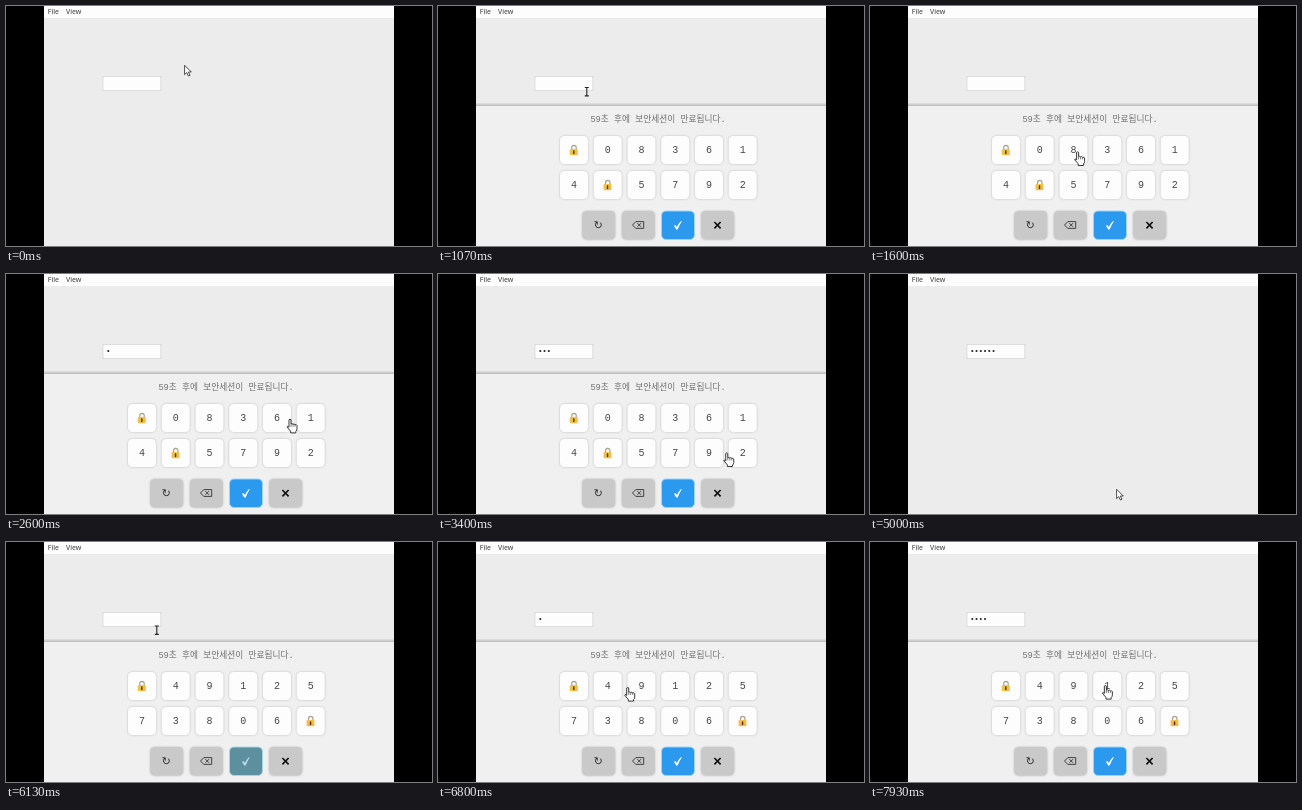
An HTML page for the animation above (8 s loop, 426 px wide and 240 px high).

```html
<!DOCTYPE html>
<html lang="ko">
<head>
<meta charset="utf-8">
<title>Secure keypad</title>
<style>
  html, body { margin: 0; width: 100%; height: 100%; overflow: hidden; background: #000; }
  svg { display: block; width: 100vw; height: 100vh; }
  .menu { font: 7px "Noto Sans", "Open Sans", sans-serif; fill: #3c3c38; }
  .notice { font: 8.7px "Liberation Mono", "Noto Sans CJK KR", "Noto Sans CJK", monospace; fill: #707070; }
  .digit { font: 10px "Liberation Mono", monospace; fill: #444; }
  .icon { font: 11px "DejaVu Sans", sans-serif; fill: #333; }
  .notice, .digit, .icon { text-anchor: middle; }
  .key { fill: #fdfdfd; }
  .key, .action { filter: drop-shadow(0 .8px 1px rgba(0, 0, 0, .22)); }
  .action { fill: #c9c9c9; }
  .ok { fill: #2b99ee; stroke: #9fd2f6; filter: none; }
  .line { fill: none; stroke: #333; stroke-width: .9; }
  .pointer path { stroke-linejoin: round; }
  .dull .ok { fill: #5c909e; stroke: #a5d6e0; }
  .dull .tick { fill: #b9dce5; }
  .dull .brass { fill: #bd9f66; }
</style>
</head>
<body>
<svg viewBox="0 0 426 240">
  <defs>
    <linearGradient id="edge" x2="0" y2="1">
      <stop offset="0" stop-color="#000" stop-opacity="0"/>
      <stop offset="1" stop-color="#000" stop-opacity=".22"/>
    </linearGradient>
    <g id="lock">
      <path d="M-2.2-.6V-2.4a2.2 2.2 0 0 1 4.4 0v1.8" fill="none" stroke="#aaa08c" stroke-width="1.2"/>
      <rect class="brass" x="-4.2" y="-.9" width="8" height="6.2" rx="1" fill="#efc14b"/>
      <path d="M-.2 1V3.4" stroke="#4a3a20" stroke-width="1.5" stroke-linecap="round"/>
    </g>
  </defs>
  <rect width="426" height="240"/>
  <rect x="38" width="350" height="240" fill="#ececec"/>
  <rect x="38" width="350" height="12" fill="#fdfdfd"/>
  <text class="menu" x="41.8" y="8.2">File</text>
  <text class="menu" x="60" y="8.2">View</text>
  <rect x="97" y="70.4" width="57.8" height="14.2" fill="#fdfdfd" stroke="#d8d8d8" stroke-width=".8"/>
  <g id="dots" fill="#222"></g>

  <g id="panel">
    <rect x="38" y="96.5" width="350" height="3.5" fill="url(#edge)"/>
    <rect x="38" y="100" width="350" height="140" fill="#f0f0f0"/>
    <text class="notice" x="220" y="115.8">59초 후에 보안세션이 만료됩니다.</text>
    <g id="keys"></g>
    <g id="actions"></g>
    <text class="icon" x="160.4" y="222.8">↻</text>
    <path class="line" d="M194.5 219l3.3-3.4h7.9v6.8h-7.9zM199.4 217.2l3.6 3.6M203 217.2l-3.6 3.6"/>
    <path class="tick" d="M236 219.8l1.4-.8 1.5 2q1.8-3.6 4.1-5.9l.7.3q-2.5 3.6-4 8h-1.5z" fill="#fff"/>
    <path d="M276.4 216l6.2 6.4M282.6 216l-6.2 6.4" stroke="#111" stroke-width="1.7"/>
  </g>

  <g id="arrow" class="pointer">
    <path d="M.3.3V9.6L2.5 7.6 4.1 11 5.7 10.3 4.1 7H7z" fill="#fff" stroke="#222" stroke-width=".8"/>
  </g>
  <g id="beam" class="pointer">
    <path d="M.8 0H4.8M2.8 0V8.4M.8 8.4H4.8" fill="none" stroke="#222" stroke-width="1.1"/>
  </g>
  <g id="hand" class="pointer">
    <path d="M2.1 7.8V.4q1-1.2 2 0V4.7q1.1-.9 2 .2 1.2-.7 2 .4 1.5-.5 2 .7V9.4q0 1.6-1.2 2.6V13.5H3.7V11.8L.2 7.8Q0 6.1 2.1 7.8z" fill="#fff" stroke="#222" stroke-width=".9"/>
    <path d="M4.1 5V7.4M6.1 5.2V7.4M8.1 5.6V7.4" stroke="#222" stroke-width=".6"/>
  </g>
</svg>
<script>
const LOOP = 8000, STEP = 200 / 3, TRAVEL = 450;
const SESSIONS = [
  { open: 1060, close: 4860, pad: "*083614*5792", code: "812977", first: 2290, gap: 450 },
  { open: 6060, close: LOOP, pad: "*4912573806*", code: "4921", first: 6600, gap: 400 }
];
const $ = id => document.getElementById(id);
const show = (el, on) => { el.style.display = on ? "" : "none"; };
const ease = k => k * k * (3 - 2 * k);
const clamp = k => Math.min(1, Math.max(0, k));
const times = (n, make) => Array.from({ length: n }, (_, i) => make(i)).join("");

const keyAt = i => [136 + 33.75 * (i % 6), 144 + 35 * Math.floor(i / 6)];
const box = (cls, x, y, w, h) =>
  `<rect class="${cls}" x="${x}" y="${y}" width="${w}" height="${h}" rx="4.5"/>`;

function key(ch, i) {
  const [x, y] = keyAt(i);
  const face = ch === "*" ? `<use href="#lock" x="${x}" y="${y}"/>`
                          : `<text class="digit" x="${x}" y="${y + 3.3}">${ch}</text>`;
  return box("key", x - 14, y - 14, 28, 28) + face;
}

$("keys").innerHTML = SESSIONS.map(s => `<g>${[...s.pad].map(key).join("")}</g>`).join("");
$("actions").innerHTML = times(4, i =>
  box(i === 2 ? "action ok" : "action", 144.2 + 39.65 * i, 205, 33, 28.5));
$("dots").innerHTML = times(6, i => `<circle cx="${102.3 + 4.25 * i}" cy="77" r="1.05"/>`);

// The aim slips a little to the left and up with each key.
const typing = s => [...s.code].map((ch, i) => {
  const [x, y] = keyAt(s.pad.indexOf(ch));
  const from = i ? s.first + s.gap * (i - 1) : s.open + 70;
  return [from, Math.min(TRAVEL, s.first + s.gap * i - from), x + 1 - 2 * i, y + 2 - .8 * i];
});

// Each move: start, duration, x, y
const HOME = [178.3, 59];
const MOVES = [
  [600, 330, 146, 81.5],
  ...typing(SESSIONS[0]),
  [4540, 260, 246.3, 215],
  [5200, 530, 135, 84],
  [5730, 200, 148, 84],
  ...typing(SESSIONS[1])
];

const pointerAt = t => MOVES.reduce(([x, y], [from, span, tx, ty]) => {
  const k = ease(clamp((t - from) / span));
  return [x + (tx - x) * k, y + (ty - y) * k];
}, HOME);

const pads = [...$("keys").children], dots = [...$("dots").children];
const pointers = ["arrow", "beam", "hand"].map($);

function draw(t) {
  const n = t < SESSIONS[1].open ? 0 : 1, s = SESSIONS[n];
  const open = t >= s.open && t < s.close;
  show($("panel"), open);
  $("panel").classList.toggle("dull", n === 1 && t < s.open + 2 * STEP);
  pads.forEach((pad, i) => show(pad, i === n));
  dots.forEach((dot, i) => show(dot, i < s.code.length && t >= s.first + s.gap * i));

  const [x, y] = pointerAt(t);
  const inField = x > 97 && x < 155 && y > 70 && y < 85;
  const shape = inField ? "beam" : open && y > 125 ? "hand" : "arrow";
  for (const p of pointers) {
    show(p, p.id === shape);
    p.setAttribute("transform", `translate(${x} ${y})`);
  }
}

const start = performance.now();
function tick() {
  const t = (performance.now() - start) % LOOP;
  draw(Math.min(Math.floor((t + 4) / STEP) * STEP, LOOP - STEP));
  requestAnimationFrame(tick);
}
tick();
</script>
</body>
</html>
```
